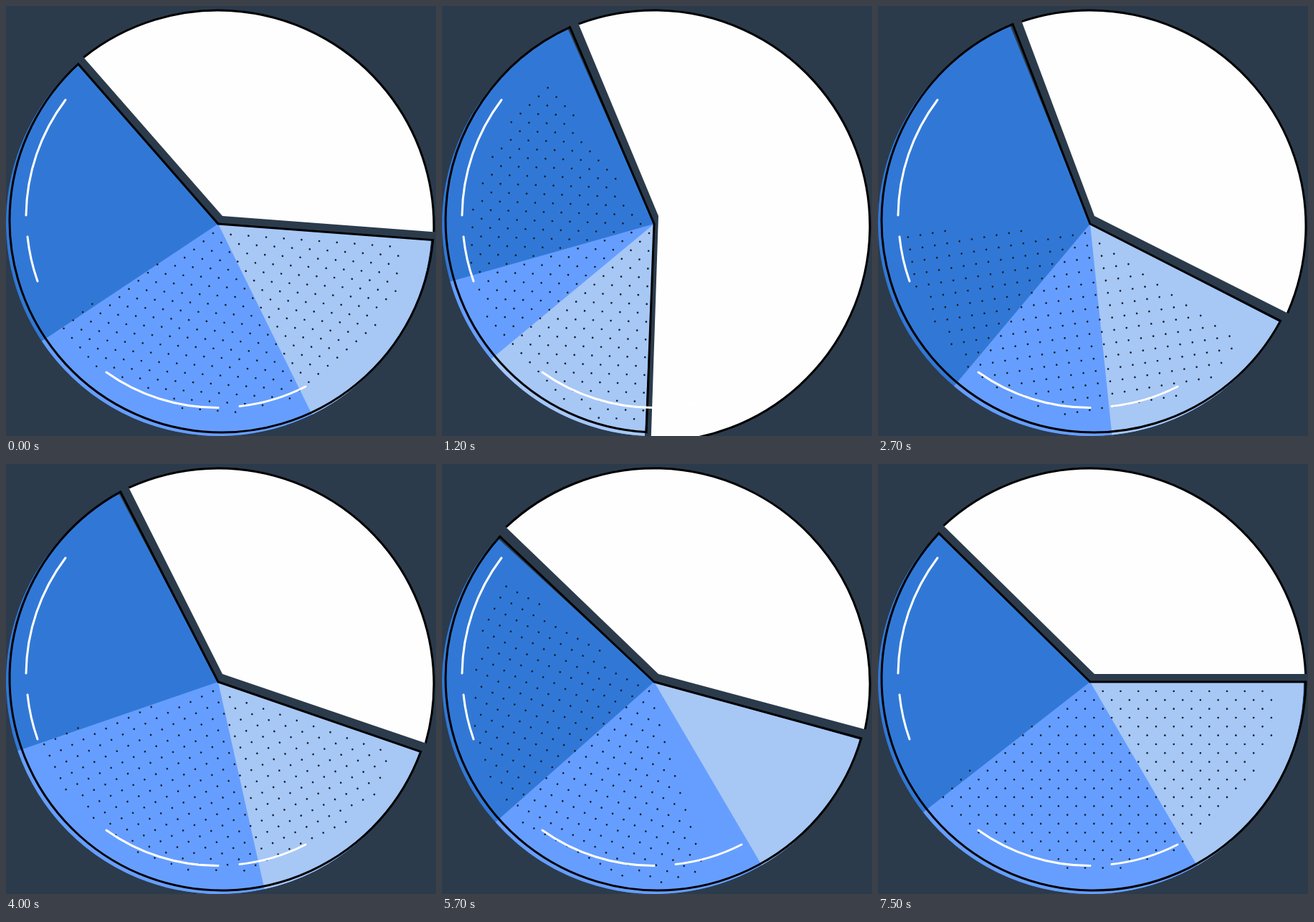
Animation, 600 px wide and 600 px high, one loop 7600 ms. Source, as an HTML page with a canvas:

```html
<!DOCTYPE html>
<html lang="en">
<head>
<meta charset="utf-8">
<title>Pie</title>
<style>
html, body { margin: 0; width: 100%; height: 100%; overflow: hidden; background: #2b3b4b; }
canvas { display: block; width: 600px; height: 600px; }
</style>
</head>
<body>
<canvas id="stage" width="600" height="600"></canvas>
<script>
const ctx = document.getElementById('stage').getContext('2d');
const LOOP = 7600, SWING = 3800, STEP = 100, LEAD = 100;
const RAD = Math.PI / 180;

const APEX = { x: 296, y: 304 };
const LID_APEX = { x: 302, y: 293 };
const DISC = { x: 297, y: 303, r: 297 };
const RING = { x: 301, y: 299, r: 296 };
const LID = { x: 296, y: 307, r: 301 };
const COLORS = { back: '#2b3b4b', dark: '#3178d6', mid: '#669eff', light: '#a7c7f5', lid: '#fefefe', dot: '#16202e' };

// Edge angles at rest, clockwise from the right
const REST = { mid: 59.8, dark: 142, end: 224.5 };

// Each track: [ms, degrees]
const tracks = {
  turn: [[0, 0], [100, 4.3], [300, 18.8], [600, 39], [900, 31.5], [1300, 22.9], [1700, 8], [2000, -0.6],
    [2100, 5], [2400, 44], [2550, 48], [2700, 38], [2800, 25], [3000, 10.6], [3300, 1.5], [3800, 0]],
  light: [[0, 0], [300, 0], [1300, 69], [1700, 16], [2000, 15.6], [2300, 5], [2800, 1.7], [3000, 0.3], [3800, 0]],
  mid: [[0, 0], [300, -1.2], [1300, 57.6], [1700, 6], [2000, 0.4], [2800, -0.7], [3000, -0.2], [3800, 0]],
  dark: [[0, 0], [300, 0.2], [1300, -0.7], [2000, -2.9], [2400, -10], [2800, -37], [3000, -34], [3800, 0]],
  dots: [[0, 0], [100, 4.25], [300, 19.3], [1300, 91.9], [1550, 94], [2000, 73], [2800, 35.5], [3000, 25], [3800, 0]],
  inset: [[0, 0], [100, 0], [300, 1.1], [2800, 1.5], [3000, 1.9], [3800, 0]]
};

// Monotone cubic interpolation: smooth, without overshoot
function slope(p, i) {
  if (i === 0 || i === p.length - 1) return 0;
  const a = (p[i][1] - p[i - 1][1]) / (p[i][0] - p[i - 1][0]);
  const b = (p[i + 1][1] - p[i][1]) / (p[i + 1][0] - p[i][0]);
  return a * b <= 0 ? 0 : 2 * a * b / (a + b);
}

function sample(p, t) {
  let i = 0;
  while (i < p.length - 2 && t >= p[i + 1][0]) i++;
  const span = p[i + 1][0] - p[i][0], s = (t - p[i][0]) / span;
  const s2 = s * s, s3 = s2 * s;
  return (2 * s3 - 3 * s2 + 1) * p[i][1] + (s3 - 2 * s2 + s) * span * slope(p, i)
    + (3 * s2 - 2 * s3) * p[i + 1][1] + (s3 - s2) * span * slope(p, i + 1);
}

// Angle around the circle where a ray from the apex leaves it
function exitAngle(apex, circle, deg) {
  const cos = Math.cos(deg * RAD), sin = Math.sin(deg * RAD);
  const dx = apex.x - circle.x, dy = apex.y - circle.y;
  const along = dx * cos + dy * sin;
  const d = -along + Math.sqrt(along * along - dx * dx - dy * dy + circle.r * circle.r);
  return Math.atan2(dy + d * sin, dx + d * cos);
}

function arcPath(apex, circle, from, to) {
  ctx.arc(circle.x, circle.y, circle.r, exitAngle(apex, circle, from), exitAngle(apex, circle, to));
}

function wedge(apex, circle, from, to) {
  ctx.beginPath();
  ctx.moveTo(apex.x, apex.y);
  arcPath(apex, circle, from, to);
  ctx.closePath();
}

function fillWedge(apex, circle, from, to, color) {
  wedge(apex, circle, from, to);
  ctx.fillStyle = color;
  ctx.fill();
}

// Staggered dot lattice, cut to a sector
const dots = [];
for (let row = 0; row < 23; row++) {
  for (let col = -14; col < 14; col++) {
    const x = 24.75 * col + (row % 2) * 12.375, y = 12.33 * row;
    const dx = x - 7, dy = y + 13;
    const angle = Math.atan2(dy, dx) / RAD;
    if (Math.hypot(dx, dy) < 264 && angle < 143.6) dots.push([x, y]);
  }
}

function drawDots(turn) {
  ctx.save();
  ctx.translate(289, 317);
  ctx.rotate(turn * RAD);
  ctx.fillStyle = COLORS.dot;
  ctx.beginPath();
  for (const [x, y] of dots) {
    ctx.moveTo(x + 1.35, y);
    ctx.arc(x, y, 1.35, 0, 2 * Math.PI);
  }
  ctx.fill();
  ctx.restore();
}

const shine = new Path2D(
  'M28 292 A272 272 0 0 1 83 131 M44 384 A272 272 0 0 1 30 322 ' +
  'M296 560.5 A266 266 0 0 1 140 511 M418 531 A266 266 0 0 1 326 558.5');

function draw(time) {
  const t = (time + LEAD) % SWING;
  const at = name => sample(tracks[name], t);
  const turn = at('turn'), inset = at('inset');
  const start = turn + at('light');
  const mid = REST.mid + turn + at('mid');
  const dark = REST.dark + turn + at('dark');
  const end = REST.end + turn;
  const first = start + inset * 0.5, last = end - inset;

  ctx.fillStyle = COLORS.back;
  ctx.fillRect(0, 0, 600, 600);

  // Later slices lie beneath earlier ones, so no seams show
  fillWedge(APEX, DISC, first, last, COLORS.dark);
  fillWedge(APEX, DISC, first, dark, COLORS.mid);
  fillWedge(APEX, DISC, first, mid, COLORS.light);

  ctx.save();
  wedge(APEX, DISC, first, last);
  ctx.clip();
  drawDots(at('dots'));
  ctx.restore();

  ctx.strokeStyle = '#000';
  ctx.lineWidth = 3;
  ctx.lineCap = 'butt';
  wedge(APEX, RING, start + inset * 0.2, end - inset * 0.45);
  ctx.stroke();

  fillWedge(LID_APEX, LID, end, start + 360, COLORS.lid);
  ctx.beginPath();
  arcPath(LID_APEX, LID, end, start + 360);
  ctx.stroke();

  ctx.strokeStyle = '#fff';
  ctx.lineCap = 'round';
  ctx.stroke(shine);
}

const begin = performance.now();
function frame() {
  const time = (performance.now() - begin) % LOOP;
  draw(Math.floor(time / STEP) * STEP);
  requestAnimationFrame(frame);
}
frame();
</script>
</body>
</html>
```
